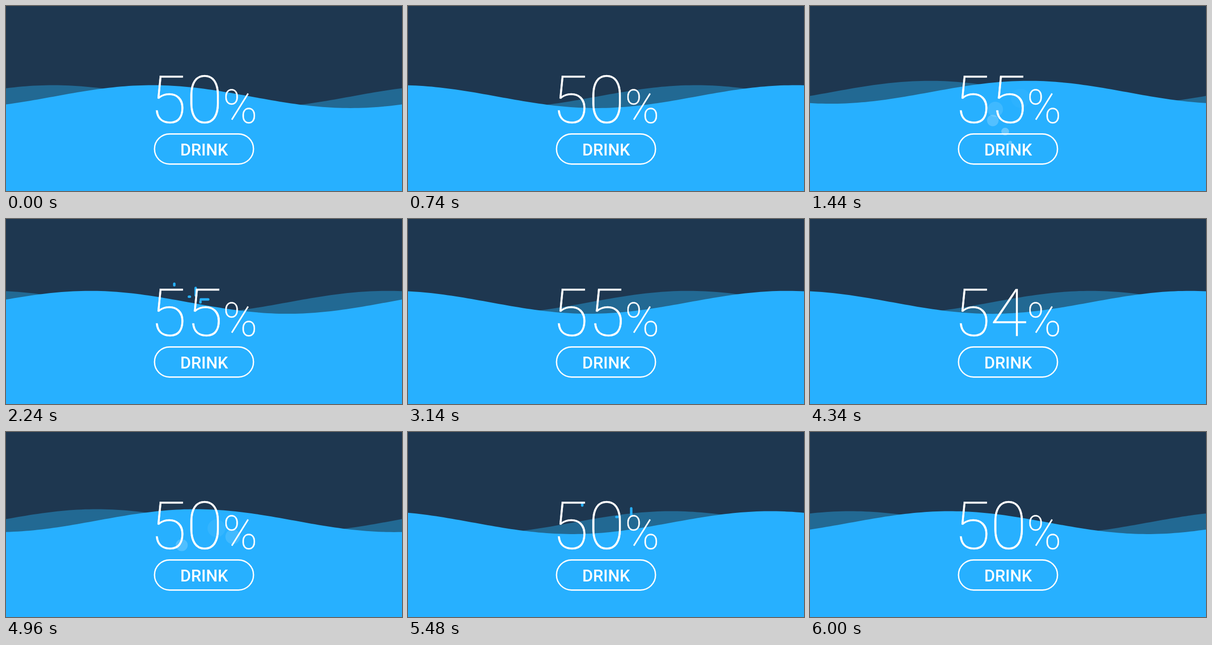
Recreate the animation shown at these times as an HTML page. Size 800x375 px, loop 6.02 s.

```html
<!DOCTYPE html>
<html lang="en">
<head>
<meta charset="utf-8">
<title>Water level</title>
<style>
  html, body { margin: 0; width: 100%; height: 100%; overflow: hidden; background: #1e3750; }
  svg { display: block; width: 100vw; height: 100vh; }
  text { font-family: Roboto, "Open Sans", sans-serif; fill: #fff; text-anchor: middle; }
  .thin { font-weight: 100; stroke: #fff; stroke-width: .6px; }
  .label { font-weight: 500; font-size: 33.3px; }
</style>
</head>
<body>
<svg viewBox="0 0 800 375">
  <rect width="800" height="375" fill="#1e3750"/>
  <path id="back" fill="#226993"/>
  <g id="drops" fill="#27b0ff"></g>
  <path id="front" fill="#27b0ff"/>
  <g id="bubbles" fill="#fff"></g>
  <text id="count" class="thin" x="364.5" y="236.5" font-size="134.3">50</text>
  <text class="thin" x="473" y="236.5" font-size="94">%</text>
  <rect x="300" y="259.3" width="200" height="61" rx="30.5" fill="none" stroke="#fff" stroke-width="2.7"/>
  <text class="label" x="400.3" y="302.6">DRINK</text>
</svg>
<script>
const LOOP = 6020, RISE = 880, FALL = 4310, EASE_TIME = 1000, STEP = 80;
const WAVE = 800, BUBBLE_LIFE = 600;

const bubbleBursts = [
  { start: RISE, count: 5, gap: 125, drift: .1, phase: 2.67, turn: 1.1 },
  { start: FALL + 135, count: 3, gap: 95, drift: .17, phase: .29, turn: 1.9 }
];
const splashes = [
  { start: 1960, count: 5, left: 340, spread: 30.5 },
  { start: 5200, count: 3, left: 352, spread: 70 }
];

const $ = id => document.getElementById(id);
const clamp = v => Math.min(1, Math.max(0, v));
const ease = v => (1 - Math.cos(Math.PI * clamp(v))) / 2;

function setAll(node, values) {
  for (const name in values) node.setAttribute(name, values[name]);
}

// One node per member of each group, with its group and index.
function populate(parent, tag, groups) {
  return groups.flatMap(group => Array.from({ length: group.count }, (_, i) => ({
    group, i,
    node: parent.appendChild(document.createElementNS("http://www.w3.org/2000/svg", tag))
  })));
}

const bubbles = populate($("bubbles"), "circle", bubbleBursts);
const drops = populate($("drops"), "rect", splashes);

function wavePath(crest, level) {
  let d = "M0 375";
  for (let x = 0; x <= 800; x += 8) {
    const y = level - 23.2 * Math.cos((x - crest) * 2 * Math.PI / WAVE);
    d += `L${x} ${y.toFixed(2)}`;
  }
  return d + "L800 375Z";
}

function percent(t) {
  const steps = start => t < start ? 0 : Math.min(5, 1 + Math.floor((t - start) / STEP));
  return 50 + steps(RISE) - steps(FALL);
}

function drawBubble({ node, group, i }, t) {
  const age = t - group.start - i * group.gap;
  const alive = age > 0 && age < BUBBLE_LIFE;
  const speed = group.drift * Math.sin(group.phase + i * group.turn);
  setAll(node, {
    cx: 400 + speed * age,
    cy: 288 - .18 * age,
    r: alive ? 2 + .031 * age : 0,
    opacity: alive ? Math.min(.3, .42 * (1 - age / BUBBLE_LIFE)) : 0
  });
}

function drawDrop({ node, group, i }, t, level) {
  const p = (t - group.start - 45 * i) / (760 - 100 * i);
  const height = (42 - 4 * i) * (i % 2 ? .5 : 1);
  const x = group.left + group.spread * Math.sqrt(i);
  const y = level + 3 + 3 * i - height * 4 * p * (1 - p);
  const length = i % 2 ? 7 : Math.min(20, 8 + 6 * i);
  const [w, h] = i % 3 === 1 ? [length, 5] : [5, length];
  setAll(node, {
    x: x - w / 2, y: y - h / 2, width: w, height: h, rx: 2.5,
    visibility: p > 0 && p < 1 ? "visible" : "hidden"
  });
}

function draw(t) {
  const level = 183.7 - 14.8 * (ease((t - RISE) / EASE_TIME) - ease((t - FALL) / EASE_TIME));
  const crest = 295 + 5 * WAVE * t / LOOP - 16 * Math.sin(Math.PI * t / LOOP);
  $("front").setAttribute("d", wavePath(crest, level));
  $("back").setAttribute("d", wavePath(crest - WAVE / 4, level));
  $("count").textContent = percent(t);
  bubbles.forEach(bubble => drawBubble(bubble, t));
  drops.forEach(drop => drawDrop(drop, t, level));
}

const start = performance.now();
function tick() {
  draw((performance.now() - start) % LOOP);
  requestAnimationFrame(tick);
}
tick();
</script>
</body>
</html>
```
